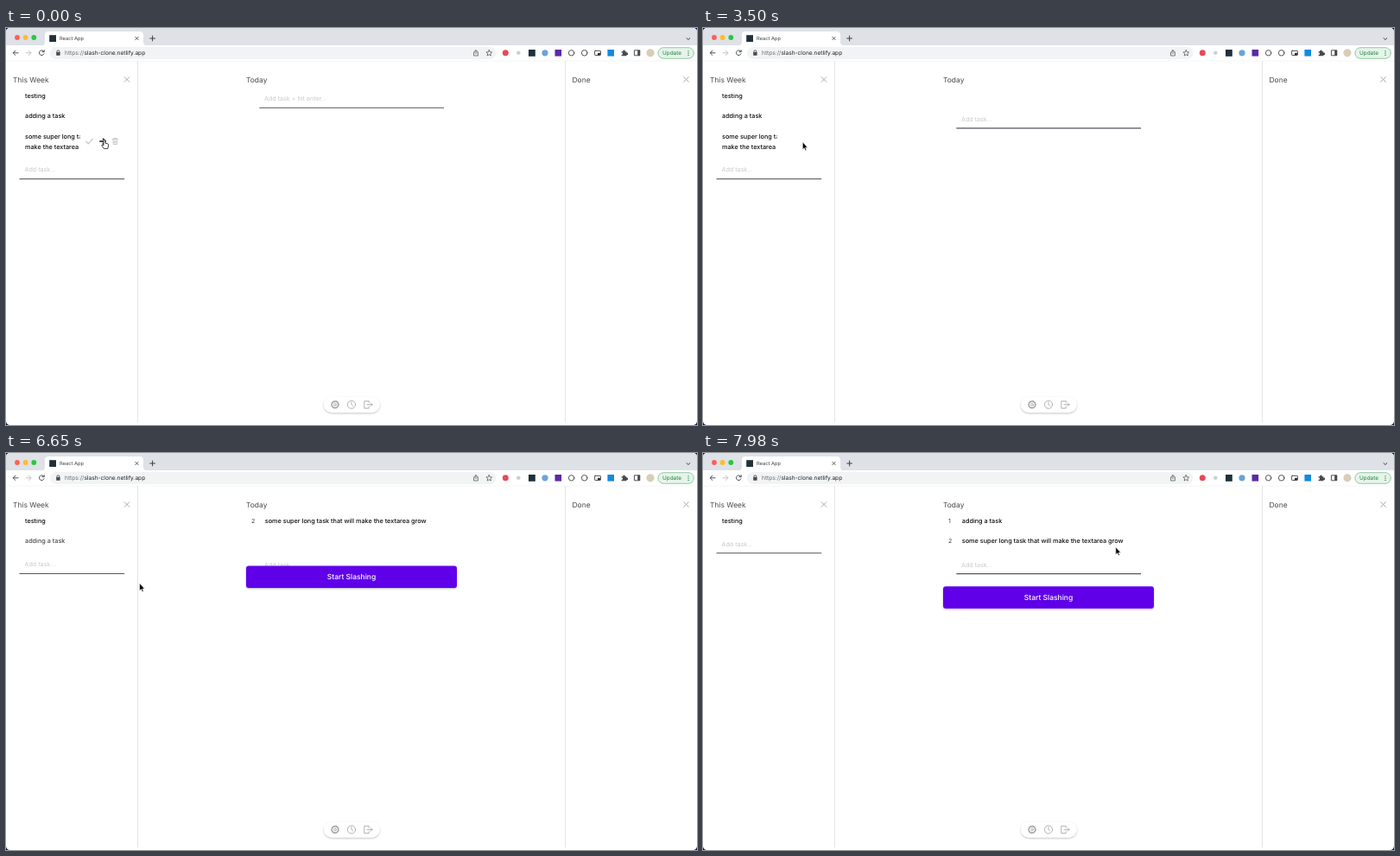
Write an HTML page that moves like this. It is 800 by 459 pixels and loops after 8 s.

```html
<!DOCTYPE html>
<html lang="en">
<head>
<meta charset="utf-8">
<title>Task board</title>
<style>
  html, body { margin: 0; width: 100%; height: 100%; overflow: hidden; background: #fff; }
  svg { display: block; width: 100%; height: 100%; }
  text { font-family: Inter, "Liberation Sans", sans-serif; white-space: pre; text-rendering: geometricPrecision; }
  .head { font-size: 8.45px; fill: #4a4a4f; }
  .task { font-size: 7.28px; font-weight: 500; fill: #0c0c0e; }
  .hint { font-size: 7.15px; fill: #c9c9ce; }
  .num { font-size: 7px; fill: #3c3c42; }
  .line { fill: none; stroke-linecap: round; stroke-linejoin: round; }
  .rule { stroke: #55555c; stroke-width: 1.1; }
</style>
</head>
<body>
<svg viewBox="0 0 800 459">
  <defs>
    <filter id="soft" x="-10%" y="-30%" width="120%" height="180%">
      <feDropShadow dx="0" dy="1" stdDeviation="1" flood-color="#000" flood-opacity=".28"/>
    </filter>
    <path id="cross" class="line" d="M-2.8-2.8L2.8 2.8M2.8-2.8L-2.8 2.8"/>
    <clipPath id="narrow"><rect x="20" y="116" width="65.6" height="28"/></clipPath>
  </defs>

  <rect width="800" height="459" fill="#17104f"/>
  <rect width="800" height="459" rx="4.5" fill="#fff"/>

  <!-- tab strip -->
  <path d="M0 20V4.5Q0 0 4.5 0H795.5Q800 0 800 4.5V20Z" fill="#dee1e6"/>
  <circle cx="13" cy="11" r="2.9" fill="#ff5f57"/>
  <circle cx="22.6" cy="11" r="2.9" fill="#febc2e"/>
  <circle cx="32.3" cy="11" r="2.9" fill="#28c840"/>
  <path d="M41 20.5Q45 20 45 16V8Q45 4 49 4H155Q159 4 159 8V16Q159 20 163 20.5Z" fill="#fff"/>
  <rect x="50.2" y="8.2" width="7.8" height="7.8" fill="#20303a"/>
  <text x="62" y="14.3" font-size="5.75" fill="#3c4043">React App</text>
  <use href="#cross" transform="translate(151.5 12) scale(.62)" stroke="#3c4043" stroke-width="1.3"/>
  <path class="line" d="M166.7 12H172.5M169.6 9.1V14.9M788 11.7L789.9 13.5L791.8 11.7" stroke="#3c4043" stroke-width="1"/>

  <!-- toolbar -->
  <rect x="51" y="22" width="516.5" height="14" rx="7" fill="#f1f3f4"/>
  <g class="line" stroke="#46494d" stroke-width=".95">
    <path d="M14 28.8H8.3M10.9 26.1L8.2 28.8L10.9 31.5"/>
    <path d="M23.2 28.8H28.9M26.3 26.1L29 28.8L26.3 31.5" stroke="#bcbfc3"/>
    <path d="M43.9 27.2A2.9 2.9 0 1 0 44.1 29.8M44.2 25.6V27.6H42.1"/>
    <path d="M59 28.3V27.2A1.4 1.4 0 0 1 61.8 27.2V28.3"/>
    <path d="M542.6 27.8H541.6V32H546.4V27.8H545.4M544 29.8V25.6M542.6 26.9L544 25.5L545.4 26.9" stroke-width=".7"/>
    <path d="M559.3 25.5L560.3 27.7L562.7 28L560.9 29.6L561.4 32L559.3 30.8L557.2 32L557.7 29.6L555.9 28L558.3 27.7Z" stroke-width=".7"/>
    <circle cx="654.6" cy="28.8" r="3.2"/>
    <circle cx="669.7" cy="28.8" r="3.3"/>
    <rect x="681.6" y="26.3" width="6.8" height="5.2" rx=".6"/>
    <rect x="727.8" y="25.8" width="6" height="6"/>
  </g>
  <rect x="58.2" y="28" width="4.4" height="3.7" rx=".5" fill="#46494d"/>
  <text x="68" y="31.1" font-size="6.6" fill="#202124"><tspan fill="#6a6e73">https://</tspan>slash-clone.netlify.app</text>
  <circle cx="578.3" cy="28.8" r="3.5" fill="#e54a5c"/>
  <circle cx="593.3" cy="28.8" r="2.3" fill="#c9d0d4"/>
  <rect x="605" y="25" width="7.8" height="7.8" fill="#20303a"/>
  <circle cx="624" cy="28.8" r="3.6" fill="#6ba3d6"/>
  <rect x="635.5" y="25" width="7.6" height="7.6" fill="#5b2aa8"/>
  <rect x="685" y="28.8" width="3.2" height="2.5" fill="#303236"/>
  <rect x="696.4" y="25" width="7.6" height="7.6" fill="#1689de"/>
  <path d="M712.6 27.2H714.3A1.3 1.3 0 1 1 716.7 27.2H718.4V28.8A1.2 1.2 0 1 1 718.4 31V32.3H712.6V30.8A1.1 1.1 0 1 0 712.6 28.7Z" fill="#46494d"/>
  <rect x="731.2" y="25.8" width="2.8" height="6" fill="#46494d"/>
  <circle cx="746" cy="28.8" r="4.6" fill="#d9cdb8"/>
  <rect x="754.9" y="22.7" width="41.4" height="12.6" rx="6.3" fill="#e6f4ea" stroke="#7dbb8f" stroke-width=".8"/>
  <text x="760" y="31.1" font-size="6.4" fill="#188038">Update</text>
  <g fill="#188038"><circle cx="790" cy="26.6" r=".7"/><circle cx="790" cy="29" r=".7"/><circle cx="790" cy="31.4" r=".7"/></g>
  <path d="M0 38H800" stroke="#eceef0" stroke-width=".6"/>

  <!-- columns -->
  <path d="M152.5 38V456M647.5 38V456" stroke="#e4e4e8" stroke-width="1"/>
  <text class="head" x="8" y="62.6">This Week</text>
  <text class="head" x="278" y="62.6">Today</text>
  <text class="head" x="655.5" y="62.6">Done</text>
  <g stroke="#a2a2a8" stroke-width=".9">
    <use href="#cross" x="140" y="59.5"/><use href="#cross" x="787.5" y="59.5"/>
  </g>

  <!-- this week -->
  <text class="task" x="22" y="80.6">testing</text>
  <text class="task" id="short" x="22" y="104.4">adding a task</text>
  <g id="long" clip-path="url(#narrow)">
    <text class="task" x="22" y="128.2">some super long task that will</text>
    <text class="task" x="22" y="139.6">make the textarea grow</text>
  </g>
  <g id="tools" class="line" stroke="#c2c2c7" stroke-width="1.1">
    <path d="M92.9.4L95.3 2.8L100.2-2.6"/>
    <path d="M123.2-2.5H129.4M125-2.6V-3.6H127.6V-2.6M124-2.3L124.3 3.6H128.3L128.6-2.3M125.6-.5V2M127-.5V2" stroke-width=".9"/>
    <path id="send" d="M108.8 0H115M112.4-2.8L115.2 0L112.4 2.8" stroke-width="1.5"/>
  </g>
  <g id="weekInput">
    <text class="hint" x="21.5" y="2.4">Add task...</text>
    <path class="rule" d="M15.5 10.5H137.2"/>
  </g>

  <!-- today -->
  <g id="first"><text class="num" x="284" y="80.5">1</text><text class="task" x="299.8" y="80.6">adding a task</text></g>
  <g id="grow"><text class="num" id="rank" x="284" y="80.5">1</text><text class="task" x="299.8" y="80.6">some super long task that will make the textarea grow</text></g>
  <g id="dayInput">
    <text class="hint" id="dayHint" x="299" y="2.4"></text>
    <path class="rule" d="M293.3 10.5H507"/>
  </g>
  <g id="button">
    <rect x="278" y="130.6" width="244" height="25.4" rx="3" fill="#5f00e9" filter="url(#soft)"/>
    <text x="400" y="146.3" font-size="8.5" font-weight="500" fill="#fff" text-anchor="middle">Start Slashing</text>
  </g>

  <!-- dock -->
  <rect x="368" y="426.5" width="64.6" height="18" rx="9" fill="#fff" filter="url(#soft)"/>
  <g class="line" stroke="#aaaab0" stroke-width=".9">
    <circle cx="381" cy="435.4" r="4.1" stroke-dasharray="2.2 1" stroke-width="1.4"/>
    <circle cx="381" cy="435.4" r="3.5"/><circle cx="381" cy="435.4" r="1.4"/>
    <circle cx="400" cy="435.4" r="4.6"/><path d="M400 432.6V435.5L401.8 437"/>
    <path d="M420.2 433.2V431.3H414.8V439.6H420.2V437.7M418 435.4H424M422.3 433.6L424.1 435.4L422.3 437.2"/>
  </g>

  <path id="hand" d="M-1 1A1 1 0 0 1 1 1V4.2L3.8 4.8Q4.9 5.1 4.7 6.2L4 10.4H-.6L-2.9 7.2Q-3.5 5.9-2.3 6L-1 7Z" fill="#fff" stroke="#111" stroke-width=".8" stroke-linejoin="round"/>
  <path id="arrow" d="M0 0V8.6L1.9 6.9L3.2 9.8L4.6 9.2L3.3 6.4H5.9Z" fill="#000" stroke="#fff" stroke-width=".6"/>
</svg>
<script>
  const LOOP = 8000, TICK = 70, MOVE_A = 3500, MOVE_B = 6580;
  const ROW = 23.7;
  const el = {};
  document.querySelectorAll("[id]").forEach(n => el[n.id] = n);

  const ramp = (t, start, length) => Math.min(1, Math.max(0, (t - start) / length));
  const easeOut = p => 1 - (1 - p) ** 2;
  const smooth = p => p * p * (3 - 2 * p);
  const place = (node, x, y) => node.setAttribute("transform", `translate(${x} ${y})`);
  const fade = (node, value) => node.setAttribute("opacity", value);

  // time, x, y of the pointer tip
  const path = [
    [0, 113.9, 129], [490, 115.3, 131.8], [3500, 115.3, 131.8], [3780, 114.5, 131],
    [4270, 114.5, 131], [4760, 110.8, 105.8], [4970, 111.2, 105.6], [6510, 111.2, 105.6],
    [6580, 124, 118], [6650, 154.6, 150.6], [7000, 273.3, 244.8], [7560, 477.8, 108.8]
  ];

  function pointer(t) {
    const i = path.findIndex(k => k[0] > t);
    if (i < 0) return path[path.length - 1].slice(1);
    const a = path[i - 1], b = path[i];
    const p = (t - a[0]) / (b[0] - a[0]);
    const q = a[0] >= 6510 && a[0] < 7000 ? p : smooth(p);
    return [a[1] + (b[1] - a[1]) * q, a[2] + (b[2] - a[2]) * q];
  }

  const leave = (t, start) => 1 - ramp(t, start, 280);
  const enter = (t, start) => ramp(t, start + 70, 250);
  const collapse = (t, start) => easeOut(ramp(t, start + 420, 280));

  function draw(t) {
    const [x, y] = pointer(t);
    const movedA = t >= MOVE_A, movedB = t >= MOVE_B;

    fade(el.long, leave(t, MOVE_A));
    fade(el.short, leave(t, MOVE_B));
    place(el.weekInput, 0, 164 - 35 * collapse(t, MOVE_A) - ROW * collapse(t, MOVE_B));

    const overB = t > 4270 && !movedB && y < 113;
    const over = !movedA || overB;
    const onSend = over && (!movedA || y < 109);
    fade(el.tools, over ? 1 : 0);
    place(el.tools, 0, movedA ? 101.6 : 131);
    el.send.setAttribute("stroke", onSend ? "#0c0c0e" : "#c2c2c7");

    const shift = ROW * easeOut(ramp(t, MOVE_B + 70, 430));
    fade(el.first, enter(t, MOVE_B));
    fade(el.grow, enter(t, MOVE_A));
    fade(el.button, enter(t, MOVE_A));
    place(el.grow, 0, shift);
    place(el.button, 0, shift);
    el.rank.textContent = movedB ? "2" : "1";
    el.dayHint.textContent = movedA ? "Add task..." : "Add task + hit enter...";
    place(el.dayInput, 0, 81.7 + ROW * (movedA + movedB));

    place(el.hand, x, y);
    place(el.arrow, x, y);
    fade(el.hand, onSend ? 1 : 0);
    fade(el.arrow, onSend ? 0 : 1);
  }

  const begin = performance.now();
  function frame() {
    const t = (performance.now() - begin) % LOOP;
    draw(Math.floor(t / TICK) * TICK);
    requestAnimationFrame(frame);
  }
  frame();
</script>
</body>
</html>
```
